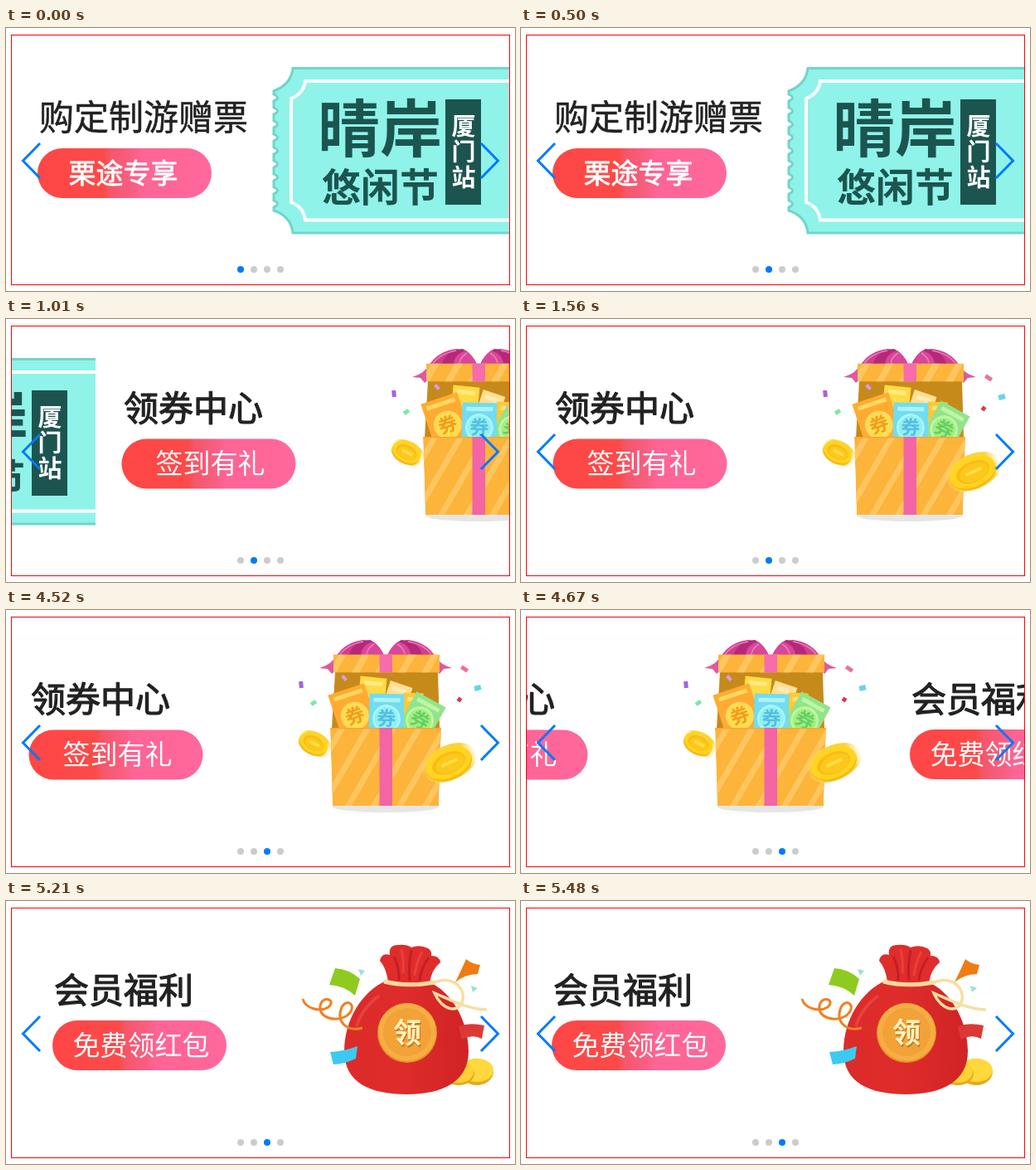
Recreate the animation shown at these times as an HTML page with a canvas. Size 614 by 317 pixels, loop 8000 ms.

```html
<!DOCTYPE html>
<html lang="zh-CN">
<head>
<meta charset="utf-8">
<title>Carousel</title>
<style>
html, body { margin: 0; width: 100%; height: 100%; overflow: hidden; background: #fff; }
canvas { display: block; }
</style>
</head>
<body>
<canvas id="stage" width="614" height="317"></canvas>
<script>
const ctx = document.getElementById('stage').getContext('2d');
const LOOP = 8000, SLIDE = 600;
const FONT = '"Noto Sans CJK SC", "Noto Sans CJK", sans-serif';
const BLUE = '#007aff';

// Moments at which the screen refreshes while a slide change is under way
const TICKS = [0, 500, 620, 770, 890, 1010, 1160, 1290, 1430, 1560,
  4520, 4670, 4790, 4940, 5060, 5210, 5330, 5480];
const MOVES = [{ start: 499, span: 961 }, { start: 4490, span: 930 }];

// cubic-bezier(.25, .1, .25, 1)
function ease(x) {
  if (x <= 0) return 0;
  if (x >= 1) return 1;
  let lo = 0, hi = 1, u = 0.5;
  for (let i = 0; i < 24; i++) {
    u = (lo + hi) / 2;
    const bx = 0.75 * u * (1 - u) + u ** 3;
    if (bx < x) lo = u; else hi = u;
  }
  return 0.3 * u * (1 - u) ** 2 + 3 * u * u * (1 - u) + u ** 3;
}

function fill(d, color) {
  ctx.fillStyle = color;
  ctx.fill(new Path2D(d));
}

function line(d, color, width) {
  ctx.strokeStyle = color;
  ctx.lineWidth = width;
  ctx.stroke(new Path2D(d));
}

function rect(x, y, w, h, color) {
  ctx.fillStyle = color;
  ctx.fillRect(x, y, w, h);
}

function oval(x, y, rx, ry, color, turn = 0) {
  ctx.fillStyle = color;
  ctx.beginPath();
  ctx.ellipse(x, y, rx, ry, turn, 0, 7);
  ctx.fill();
}

// Centres the text on (x, y); "extra" thickens the strokes by that many pixels
function text(str, x, y, size, weight, color, extra = 0) {
  ctx.font = `${weight} ${size}px ${FONT}`;
  ctx.textAlign = 'center';
  ctx.fillStyle = ctx.strokeStyle = color;
  ctx.fillText(str, x, y + size * 0.35);
  if (!extra) return;
  ctx.lineWidth = extra;
  ctx.lineJoin = 'round';
  ctx.strokeText(str, x, y + size * 0.35);
  ctx.lineJoin = 'miter';
}

function shade(x0, y0, x1, y1, ...stops) {
  const g = ctx.createLinearGradient(x0, y0, x1, y1);
  stops.forEach(([at, color]) => g.addColorStop(at, color));
  return g;
}

function heading(title, titleX, titleExtra, label, labelX, labelExtra, x, y) {
  text(title, titleX, 108, 42, 400, '#222', titleExtra);
  ctx.fillStyle = shade(x, 0, x + 210, 0, [0, '#ff4646'], [0.38, '#fc4a49'],
    [0.42, '#f5566a'], [0.55, '#fa5f84'], [0.6, '#ff6495'], [1, '#ff689b']);
  ctx.beginPath();
  ctx.roundRect(x, y, 210, 60, 30);
  ctx.fill();
  text(label, labelX, y + 30, 33, 400, '#fff', labelExtra);
}

function ticket() {
  let edge = 'M610 48.5H346Q344 68 323 76';
  for (let y = 76; y < 220; y += 16) edge += 'v4q9 4 0 8v4';
  edge += 'Q344 227 346 247H610';
  fill(edge + 'Z', '#8ff3ea');
  line(edge, '#70d5ca', 3);
  line('M610 64H361Q359 79 344 85V210Q359 216 361 231.500H610', '#fff', 4);
  const ink = '#1c554f';
  text('晴岸', 451, 123, 75, 900, ink);
  text('悠闲节', 451.5, 193, 47, 700, ink);
  rect(530, 86, 43, 127, ink);
  [...'厦门站'].forEach((c, i) => text(c, 552, 119 + i * 31, 29, 700, '#fff'));
}

// Diagonal stripes inside a box
function stripes(d, x, y, h, step, w) {
  ctx.save();
  ctx.clip(new Path2D(d));
  fill(d, '#fdb43a');
  for (let i = 0; i < 8; i++) {
    const sx = x + i * step;
    fill(`M${sx} ${y + h}l${h * 0.58} ${-h}h${w}l${-h * 0.58} ${h}Z`, '#fec65f');
  }
  ctx.restore();
}

function coin(x, y, rx, ry, turn) {
  ctx.save();
  ctx.translate(x, y);
  ctx.rotate(turn);
  const glow = shade(-rx, 0, rx, 0, [0, '#ffe27000'], [0.2, '#fbd33a'], [0.8, '#fbd33a'], [1, '#ffe27000']);
  oval(0, 0, rx, ry, glow);
  oval(-1, 2, rx * 0.82, ry * 0.86, '#f9b51c');
  oval(-1, 0, rx * 0.82, ry * 0.84, '#ffd51f');
  oval(-1, 0, rx * 0.6, ry * 0.6, '#fabb1a');
  oval(0, 1, rx * 0.52, ry * 0.5, '#fcc81c');
  rect(-rx * 0.3, -2, rx * 0.6, 4, '#ffde45');
  ctx.restore();
}

function bowSide() {
  fill('M412 52Q404 66 389 70L399 71L404 77L411 70Z', '#e0589f');
  fill('M410 55Q420 39 442 36Q459 37 467 55Z', '#d13d8f');
  fill('M425 54Q429 38 450 36Q461 41 467 55Z', '#b5297a');
  fill('M439 54Q440 42 454 38Q463 45 467 55Z', '#d9479a');
  line('M414 53Q424 41 442 38M446 53Q447 46 455 41', '#ee7dba', 1.5);
}

function coupon(x, y, w, h, turn, colors, mark) {
  ctx.save();
  ctx.translate(x, y);
  ctx.rotate(turn);
  rect(-w / 2, -h / 2, w, h, colors[0]);
  rect(-w / 2 + 5, -h / 2 + 5, w - 10, 5, colors[1]);
  if (mark) {
    oval(0, 6, 17, 17, colors[1]);
    oval(0, 6, 14, 14, colors[2]);
    text('券', 0, 6, 23, 700, colors[3]);
  }
  ctx.restore();
}

function chip(x, y, w, h, turn, color) {
  ctx.save();
  ctx.translate(x, y);
  ctx.rotate(turn);
  rect(-w / 2, -h / 2, w, h, color);
  ctx.restore();
}

function gift() {
  oval(469, 237, 64, 7, '#e6e6e6');
  bowSide();
  ctx.save();
  ctx.translate(938, 0);
  ctx.scale(-1, 1);
  bowSide();
  ctx.restore();
  fill('M408 75H532L534 143H404Z', '#c68a1b');
  coupon(453, 97, 32, 32, 0.1, ['#ffdb45', '#ffe983']);
  coupon(485, 99, 28, 20, 0.32, ['#ffdf91', '#ffebb5']);
  coupon(502, 115, 24, 30, 0.05, ['#ffc933', '#ffe27b']);
  coupon(430, 122, 46, 56, -0.32, ['#ffab32', '#ffd960', '#ffdf49', '#f29d24'], true);
  coupon(513, 128, 40, 46, 0.5, ['#91e48b', '#bdf6a2', '#a5ef7e', '#65cf68'], true);
  coupon(470, 125, 42, 48, 0.02, ['#72dcf0', '#aaf3f5', '#8df2ed', '#56bde6'], true);
  stripes('M406 53.500H534V75.500H406Z', 400, 53.5, 22, 28, 9);
  stripes('M402 142H536L533 236H405Z', 358, 142, 94, 31, 8);
  rect(402, 142, 134, 1.5, '#f5a934');
  rect(461.5, 53.5, 15.5, 22, '#f76caa');
  rect(461.5, 142, 15.5, 94, '#f365a4');
  coin(383, 161, 22, 14, 0.48);
  coin(546, 184, 35, 21, -0.42);
  chip(367, 90, 5, 8, -0.1, '#a561e8');
  chip(382, 112, 7, 5, -0.6, '#7be9a5');
  chip(419, 82, 7, 4, 0.8, '#d99be8');
  chip(564, 71, 9, 5, 0.6, '#ef7095');
  chip(580, 94, 8, 6, -0.25, '#66d3ee');
  chip(558, 108, 5, 5, 0.6, '#cf3f4c');
}

function bag() {
  oval(549, 206, 20, 16, '#e7a91d');
  oval(549, 204, 20, 14, '#ffd83b');
  oval(527, 208, 19, 14, '#e7a91d');
  oval(527, 206, 18, 13, '#ffd132');
  const red = shade(390, 0, 540, 0, [0, '#dc2b2a'], [0.45, '#df2c2b'], [1, '#d02325']);
  fill('M440 96C411 108 389 143 389 181C389 218 419 233 464 233C509 233 539 217 539 181C538 142 518 109 490 97Z', red);
  fill('M442 98Q440 81 432 72Q434 62 444 65Q442 53 454 53Q464 52 470 56Q480 52 490 57Q495 60 494 66Q504 66 505 74Q494 83 492 99Z', '#df2d2c');
  line('M449 67Q456 81 455 96M470 59Q466 79 468 96M491 68Q481 82 480 96', '#c31f23', 3);
  line('M458 58Q461 72 460 87M483 61Q475 76 474 90', '#ea403a', 3);
  line('M404 151Q410 130 431 114', '#e6423d', 4);
  line('M437 97Q465 104 499 98', '#f7dc9d', 5);
  line('M497 99C514 89 535 101 532 119C528 137 507 132 498 111C515 118 536 130 561 131', '#f8dfa0', 3.5);
  oval(465, 159, 36, 36, '#e8922a');
  oval(465, 158, 35, 35, '#f6ae43');
  oval(465, 158, 29, 29, '#f3a237');
  text('领', 466, 161, 34, 700, '#c97520');
  text('领', 465, 159, 34, 700, '#fff2bd');
  fill('M378 81Q395 82 408 94L402 114Q389 102 371 101Z', '#8fca20');
  fill('M372 182Q389 181 405 175L403 190Q388 197 376 197Z', '#3dcaf0');
  fill('M527 151Q540 146 558 150L555 166Q544 160 531 167Z', '#dc3936');
  fill('M536 70Q543 76 553 77L550 88Q535 88 523 98Q530 84 536 70Z', '#f07b12');
  line('M339 118C342 130 360 134 370 128C380 119 363 113 360 126C358 141 378 146 391 139C407 128 393 115 386 128C379 145 391 158 411 153', '#ef8122', 3);
  fill('M406 82L414 84L409 90Z', '#9fe0d4');
  fill('M542 102L550 105L544 110Z', '#9fe0d4');
}

const SLIDES = [
  () => { heading('购定制游赠票', 166, 0.5, '栗途专享', 141.5, 0.8, 38, 145); ticket(); },
  () => { heading('领券中心', 125, 1.2, '签到有礼', 145.5, 0, 38.5, 144.5); gift(); },
  () => { heading('会员福利', 123, 1.2, '免费领红包', 144, 0, 37, 144); bag(); }
];

function controls(active) {
  for (let i = 0; i < 4; i++) oval(283 + i * 16, 291, 4, 4, i === active ? BLUE : '#ccc');
  line('M41 139L20.500 160L41 181M573 139L593.500 160L573 181', BLUE, 3);
}

function draw(t) {
  const now = TICKS.filter(k => k <= t).pop();
  const offset = Math.round(SLIDE * MOVES.reduce((sum, m) => sum + ease((now - m.start) / m.span), 0));
  ctx.fillStyle = '#fff';
  ctx.fillRect(0, 0, 614, 317);
  ctx.save();
  ctx.beginPath();
  ctx.rect(7, 9, 600, 300);
  ctx.clip();
  SLIDES.forEach((slide, i) => {
    const x = i * SLIDE - offset;
    if (Math.abs(x) >= SLIDE) return;
    ctx.save();
    ctx.translate(x, 0);
    ctx.beginPath();
    ctx.rect(7, 9, SLIDE, 300);
    ctx.clip();
    slide();
    ctx.restore();
  });
  controls(MOVES.filter(m => now >= m.start).length);
  ctx.restore();
  ctx.strokeStyle = '#f00';
  ctx.lineWidth = 1;
  ctx.strokeRect(6.5, 8.5, 601, 301);
}

const begin = performance.now();
function tick() {
  draw((performance.now() - begin) % LOOP);
  requestAnimationFrame(tick);
}
tick();
</script>
</body>
</html>
```
